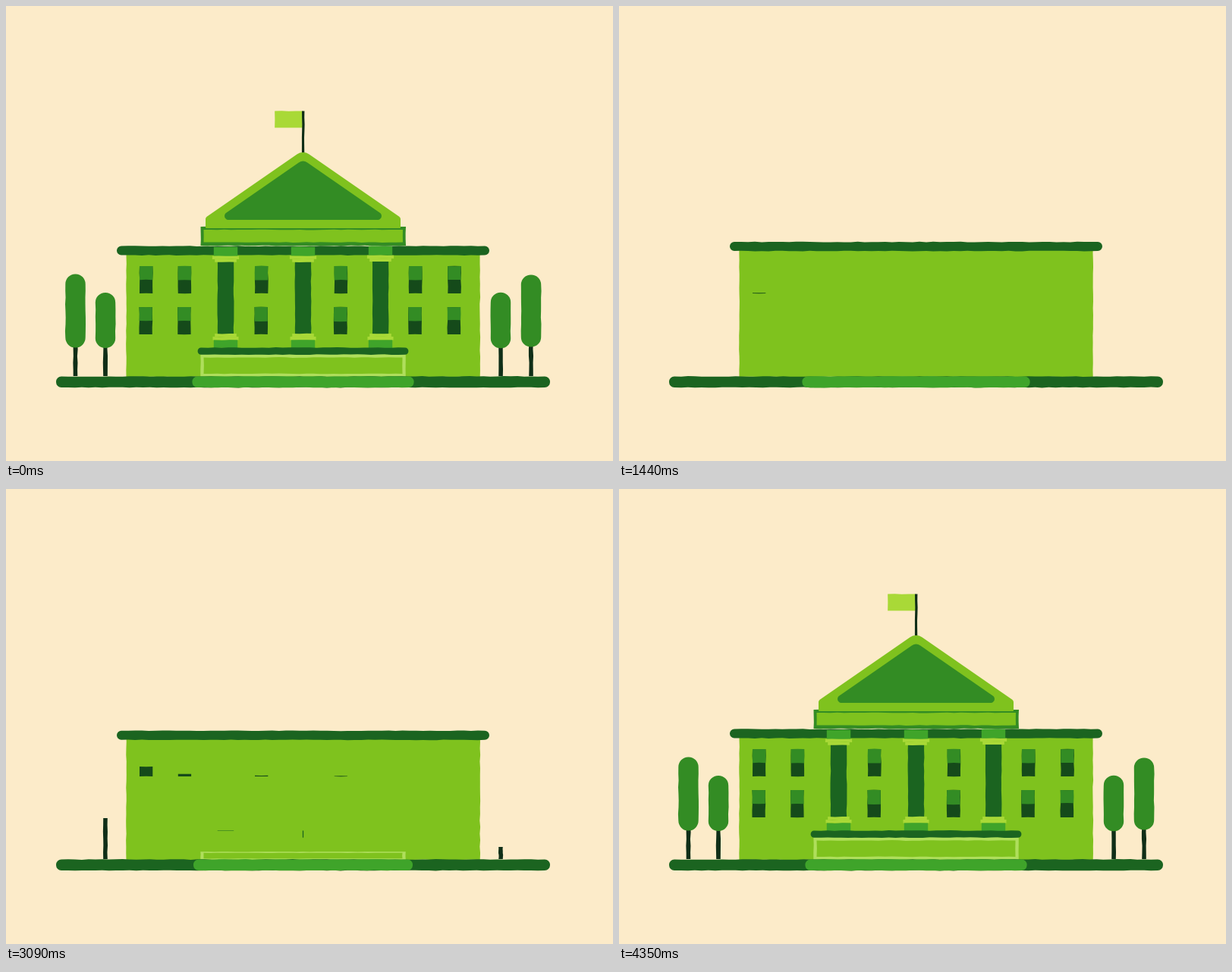
Recreate the animation shown at these times as an HTML page with a canvas. Size 800 by 600 pixels, loop 4380 ms.

```html
<!DOCTYPE html>
<html lang="en">
<head>
<meta charset="utf-8">
<title>Green building</title>
<style>
html, body { margin: 0; width: 100%; height: 100%; overflow: hidden; background: #fcebc9; }
canvas { display: block; width: 800px; height: 600px; }
</style>
</head>
<body>
<canvas id="stage" width="800" height="600"></canvas>
<script>
const ctx = document.getElementById('stage').getContext('2d');
const STEP = 30, HALF = 73, CX = 391.5;
const C = {
  sky: '#fcebc9', wall: '#7fc21e', dark: '#1b6420', mid: '#3fa42a', leaf: '#338c24',
  pane: '#154a1a', lime: '#a9d937', pale: '#afde5c', trunk: '#0f2e17'
};

let seed = 1;
function rnd() {
  seed = (seed * 16807) % 2147483647;
  return seed / 2147483647;
}
const jitter = () => (rnd() - 0.5) * 0.8;

// Cubic rise from 0 to 1, then a damped swing around 1.
function grow(b, start, { dur = 6, amp = 0.165, freq = 2.5, decay = 3 } = {}) {
  const x = (b - start) / dur;
  if (x <= 0) return 0;
  if (x < 1) return x ** 3;
  const t = (b - start - dur) * STEP / 1000;
  return 1 + amp * Math.sin(2 * Math.PI * freq * t) * Math.exp(-decay * t);
}
const expoIn = (b, end) => b <= end - 15 ? 0 : Math.min(1, 2 ** ((b - end) / 1.5));

// Scale the drawing around one point; skip it while it has no size.
function scaled(x, y, sx, sy, draw) {
  if (sx < 0.002 || sy < 0.002) return;
  ctx.save();
  ctx.translate(x, y);
  ctx.scale(sx, sy);
  ctx.translate(-x, -y);
  draw();
  ctx.restore();
}

function roughLine(x0, y0, x1, y1) {
  const len = Math.hypot(x1 - x0, y1 - y0), n = Math.max(1, Math.round(len / 9));
  const nx = (y1 - y0) / (len || 1), ny = (x0 - x1) / (len || 1);
  for (let i = 0; i <= n; i++) {
    const d = i % n ? jitter() : 0;
    ctx.lineTo(x0 + (x1 - x0) * i / n + nx * d, y0 + (y1 - y0) * i / n + ny * d);
  }
}

// Slightly uneven box given by its edges.
function box(color, l, t, r, b, rad = 0) {
  const q = Math.PI / 2;
  ctx.fillStyle = color;
  ctx.beginPath();
  roughLine(l + rad, t, r - rad, t);
  if (rad) ctx.arc(r - rad, t + rad, rad, -q, 0);
  roughLine(r, t + rad, r, b - rad);
  if (rad) ctx.arc(r - rad, b - rad, rad, 0, q);
  roughLine(r - rad, b, l + rad, b);
  if (rad) ctx.arc(l + rad, b - rad, rad, q, 2 * q);
  roughLine(l, b - rad, l, t + rad);
  if (rad) ctx.arc(l + rad, t + rad, rad, 2 * q, 3 * q);
  ctx.fill();
}

// Polygon of [x, y, corner radius].
function rounded(color, pts) {
  const n = pts.length, last = pts[n - 1];
  ctx.fillStyle = color;
  ctx.beginPath();
  ctx.moveTo((last[0] + pts[0][0]) / 2, (last[1] + pts[0][1]) / 2);
  pts.forEach(([x, y, r], i) => {
    const next = pts[(i + 1) % n];
    ctx.arcTo(x, y, next[0], next[1], r);
  });
  ctx.closePath();
  ctx.fill();
}

function tree(b, x, top, bottom, trunkH, trunkStart, crownStart) {
  scaled(x, 488, 1, grow(b, trunkStart), () => box(C.trunk, x - 2.8, 488 - trunkH, x + 2.8, 488));
  scaled(x, (top + bottom) / 2, 1, grow(b, crownStart),
    () => box(C.leaf, x - 13.2, top, x + 13.2, bottom, 13));
}

function flag(b) {
  const h = 62 * grow(b, 42, { dur: 5, amp: 0.18, decay: 4 });
  if (h < 0.3) return;
  const top = 200 - h;
  scaled(391, top, grow(b, 45, { amp: 0.1, decay: 4 }), 1,
    () => box(C.lime, 354, top, 391, top + 22));
  box(C.trunk, 390, top, 393.4, 200);
}

function pediment(b) {
  scaled(CX, 293, 1, grow(b, 38.4), () => {
    rounded(C.wall, [[263, 293, 1], [263, 279, 4], [CX, 190.5, 14], [520, 279, 4], [520, 293, 1]]);
    rounded(C.leaf, [[277, 282, 5], [CX, 203, 10], [506, 282, 5]]);
  });
}

function frieze(b) {
  const e = grow(b, 24.8, { dur: 12, amp: 0.35, freq: 4, decay: 2.6 });
  if (b < 30) return;
  const y = 40 * (1 - e);
  box(C.leaf, 256.5, 292 + y, 527, 317 + y);
  box(C.wall, 260.5, 296 + y, 523, 312.5 + y);
}

function wall(b) {
  const e = grow(b, 17, { dur: 5, amp: 0.048 });
  scaled(CX, 488.5, 1, e, () => box(C.wall, 158.5, 322.5, 624.7, 489));
  const y = 488.5 - 166 * e;
  scaled(CX, y, grow(b, 18, { dur: 5, amp: 0 }), 1,
    () => box(C.dark, 146, y - 6, 637, y + 6, 6));
}

function sash(b, x, top, delay) {
  const h = 36 * expoIn(b, 32.2 + delay), bottom = top + 36;
  if (h < 0.25) return;
  box(C.pane, x, bottom - h, x + 17.3, bottom);
  scaled(x, top, 1, grow(b, 31 + delay), () => box(C.leaf, x, top, x + 17.3, top + 18.3));
}

function sashes(b) {
  const xs = [176, 226.8, 328, 432.7, 531, 582.3], delays = [0, 3, 5, 7, 9, 11];
  xs.forEach((x, i) => {
    sash(b, x, 343, delays[i]);
    sash(b, x - 0.5, 397, 13 + 2.2 * i);
  });
}

function column(b, x, start) {
  const part = (color, half, top, bottom) => box(color, x - half, top, x + half, bottom);
  scaled(x, 451, 1, grow(b, start), () => {
    part(C.dark, 10.6, 336, 433);
    part(C.mid, 15.7, 317, 329);
    part(C.lime, 17.6, 329, 333.2);
    part(C.lime, 14.3, 333, 337.2);
    part(C.lime, 14.3, 432, 436.2);
    part(C.lime, 17, 436, 440.5);
    part(C.mid, 15.7, 440.5, 451);
  });
}

function porch(b) {
  scaled(CX, 488.5, 1, grow(b, 26, { dur: 5.7, amp: 0.02 }), () => {
    box(C.pale, 256.3, 459, 526.8, 489);
    box(C.wall, 260.5, 463.5, 522.5, 485);
  });
  scaled(CX, 455, grow(b, 29, { amp: 0.125 }), 1, () => box(C.dark, 252, 450.5, 531, 459.7, 4.5));
}

function ground(b) {
  if (b < 2) return;
  scaled(CX, 495.7, expoIn(b, 14.3), 1, () => box(C.dark, 66, 488.5, 717, 503, 7));
  scaled(CX, 495.7, grow(b, 17, { dur: 5, amp: 0.04 }), 1,
    () => box(C.mid, 245.3, 488.5, 537.7, 503, 7));
}

function draw(b) {
  seed = 4001 + b * 977;
  ctx.fillStyle = C.sky;
  ctx.fillRect(0, 0, 800, 600);
  flag(b);
  frieze(b);
  pediment(b);
  wall(b);
  sashes(b);
  [289.5, CX, 493.5].forEach((x, i) => column(b, x, 29 + 2 * i));
  porch(b);
  tree(b, 91.5, 354, 450, 79, 31, 37.4);
  tree(b, 131, 378, 451, 54, 24, 33);
  tree(b, 652, 378, 451, 54, 26, 35);
  tree(b, 692, 354, 450, 79, 34, 40.4);
  ground(b);
}

// The building folds away during the first half and rises again in the second.
let shown = -1;
const begin = performance.now();
function tick() {
  const k = Math.floor((performance.now() - begin) / STEP) % (2 * HALF);
  if (k !== shown) {
    shown = k;
    draw(k < HALF ? HALF - 1 - k : k - HALF);
  }
  requestAnimationFrame(tick);
}
tick();
</script>
</body>
</html>
```
